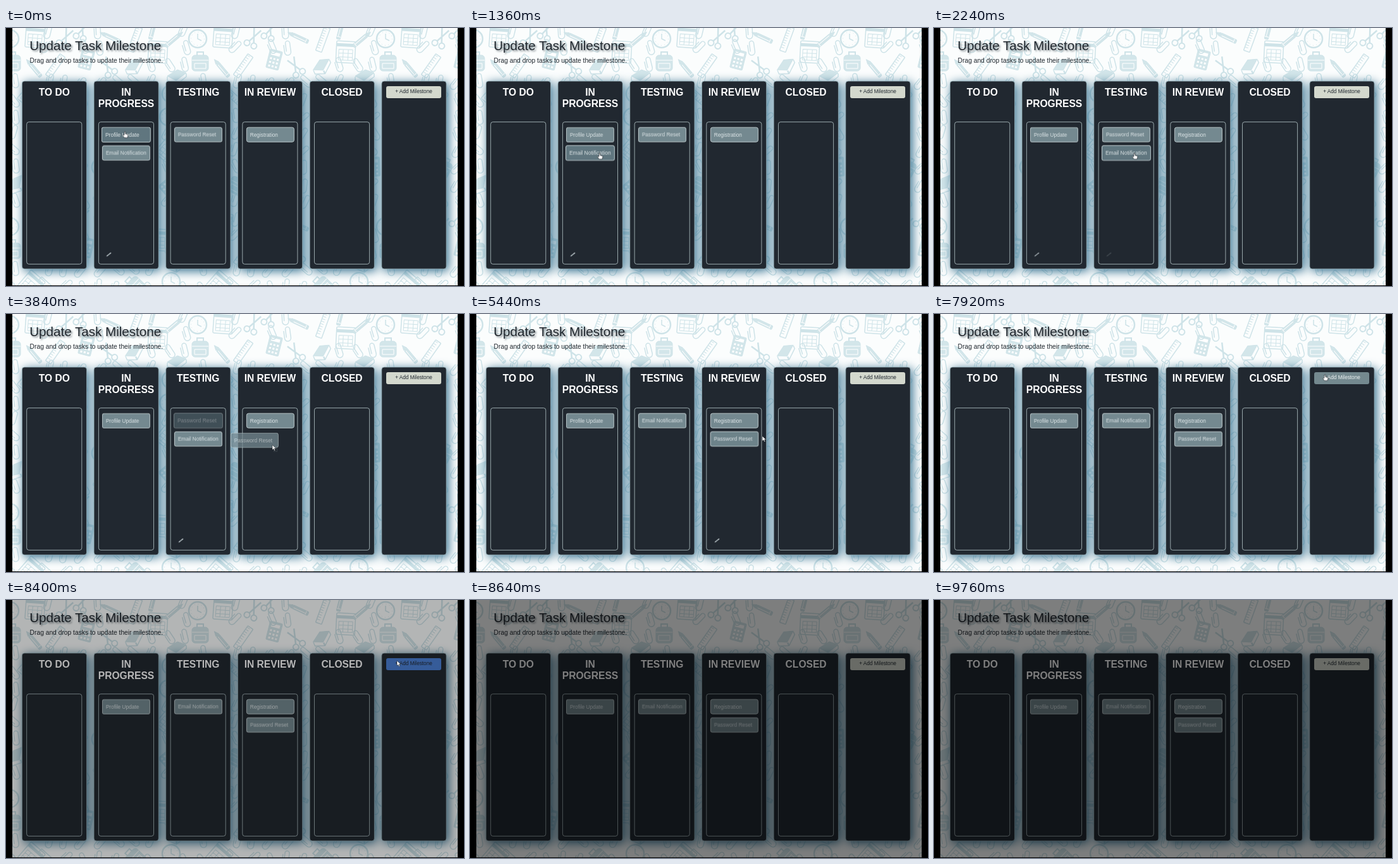
Animation of 724x408 px, one loop 9840 ms. Source, as an HTML page:

```html
<!DOCTYPE html>
<html lang="en">
<head>
<meta charset="utf-8">
<title>Update Task Milestone</title>
<style>
  html, body { margin: 0; width: 100%; height: 100%; overflow: hidden; background: #000; }
  #stage { position: relative; width: 724px; height: 408px; overflow: hidden; font-family: Arial, "Liberation Sans", sans-serif; }
  #stage * { box-sizing: border-box; }
  #stage > * { position: absolute; }
  #page { left: 10px; top: 0; width: 704px; height: 407px; background: #fbfdfd; }
  .title { font-size: 20.6px; fill: #20272e; text-shadow: 2px 2px 3px #7d868b; }
  .hint { font-size: 10.27px; fill: #20272e; }
  .col { fill: #212830; stroke: #a3bdc5; stroke-width: .8; filter: drop-shadow(3px 3px 8px #2f6c8c); }
  .list { fill: none; stroke: #b7c7ca; stroke-width: .8; }
  .name { font-size: 15.6px; font-weight: bold; text-anchor: middle; fill: #fff; }
  .card { left: 0; top: 0; width: 76px; height: 24px; }
  .card div { height: 100%; padding-left: 4.8px; border: 1px solid #b9c5c8; border-radius: 3.5px; background: #748990; color: #dbe3e5; font-size: 8.3px; line-height: 22px; white-space: nowrap; }
  #add { left: 601px; top: 92px; width: 87px; height: 18.5px; border-radius: 3px; background: #d3d8cd; color: #212830; font-size: 8.2px; line-height: 18px; text-align: center; }
  #dim { left: 10px; top: 0; width: 704px; height: 408px; background: #000; opacity: 0; }
  svg { left: 0; top: 0; overflow: visible; }
</style>
</head>
<body>
<div id="stage">
  <div id="page"></div>
  <svg id="paper" width="724" height="408">
    <defs>
      <clipPath id="pageClip"><rect x="10" width="704" height="407"/></clipPath>
      <g id="clock"><circle r="14" fill="none" stroke-width="2.5"/><circle r="10.5" fill="none" stroke-dasharray="1 4.5"/><path d="M0-8V0L6 3" fill="none" stroke-width="1.5"/></g>
      <g id="sheet"><rect x="-15" y="-17" width="30" height="34" rx="2" fill="none" stroke-width="1.5"/><path d="M-15-11H15" stroke-width="5"/><path d="M-11-4H11M-11 2H11M-11 8H11M-11 13H11M-11-4V13M-4-4V13M4-4V13M11-4V13" fill="none"/></g>
      <g id="scissors" fill="none"><circle cx="-6" cy="11" r="4.5" stroke-width="2"/><circle cx="6" cy="11" r="4.5" stroke-width="2"/><path d="M-4 7L6-16M4 7L-6-16" stroke-width="2.5"/></g>
      <g id="pencil"><rect x="-3" y="-13" width="6" height="27" rx="1.5"/><path d="M-3-14L0-21L3-14Z"/><path d="M-1-11V9M-3 10H3" stroke="#fff"/></g>
      <g id="bag"><path d="M-5-11V-16H5V-11" fill="none" stroke-width="2"/><rect x="-13" y="-11" width="26" height="25" rx="5"/><path d="M-9 2H9V10H-9ZM-13-3H13" fill="none" stroke="#fff"/></g>
      <g id="calc"><rect x="-10" y="-15" width="20" height="30" rx="2"/><path d="M-7-9H7" stroke="#fff" stroke-width="5"/><path d="M-7-1H7M-7 5H7M-7 11H7" stroke="#fff" stroke-width="3" stroke-dasharray="3 2.5"/></g>
      <g id="cube"><path d="M-15 2L1-8L15-3L-1 9Z"/><path d="M-15 3V9L-1 15V10M0 10V15L15 3V-2" fill="none" stroke-width="1.5"/></g>
      <g id="ruler"><rect x="-5" y="-20" width="10" height="40" rx="1" fill="none" stroke-width="1.5"/><path d="M-2-18V18" stroke-width="5" stroke-dasharray="1 3"/></g>
      <g id="clip" fill="none"><path d="M-3 7V-6A3 3 0 0 1 4-6V8A5 5 0 0 1-6 8V-4" stroke-width="1.5"/></g>
      <g id="tile" fill="#d3e6ea" stroke="#cee3e8"></g>
    </defs>
    <g id="tiles" clip-path="url(#pageClip)"></g>
    <text class="title" x="37.2" y="35.2">Update Task Milestone</text>
    <text class="hint" x="37.6" y="55.4">Drag and drop tasks to update their milestone.</text>
    <g id="board"></g>
  </svg>
  <div id="add">+ Add Milestone</div>
  <svg id="icons" width="724" height="408"></svg>
  <div id="dim"></div>
  <svg id="cursor" width="1" height="1">
    <g id="hand"><path transform="scale(.85)" d="M-1 0Q0-1 1 0V4L5 5Q6 5.5 5.5 8L4.5 11H-1L-4 7Q-4 5-1.5 6.5Z" fill="#fff" stroke="#1b2025" stroke-width=".8"/></g>
    <g id="arrow"><path d="M0 0V8L2 6.3L3.4 9.2L4.7 8.6L3.4 5.8H6Z" fill="#fff" stroke="#15191d" stroke-width=".5"/></g>
    <rect id="drop" x="2.5" y="5.5" width="5" height="5" fill="none" stroke="#66727a" stroke-width=".6" stroke-dasharray="1 1"/>
  </svg>
</div>
<script>
const LOOP = 9840;
const $ = id => document.getElementById(id);
const stage = $('stage'), add = $('add'), dim = $('dim');

// stops: [ms, value, ...]; the last value holds until the loop restarts
function play(el, prop, stops, easing = 'linear') {
  const keys = [];
  for (let i = 0; i < stops.length; i += 2)
    keys.push({ offset: stops[i] / LOOP, [prop]: stops[i + 1], easing });
  keys.push({ offset: 1, [prop]: stops[stops.length - 1] });
  el.animate(keys, { duration: LOOP, iterations: Infinity });
}
const HOLD = 'steps(1, end)', GLIDE = 'ease-in-out';
const at = (x, y) => `translate(${x}px, ${y}px)`;
const slot = (col, row) => [151.9 + 114 * (col - 1), 156.7 + 29 * row];

// Backdrop of school things, repeated as a square tile
const SIZE = 297;
const things = [
  ['clock', 50, 17], ['bag', 54, 54], ['sheet', 90, 14, 4], ['scissors', 138, 16, 25],
  ['pencil', 10, 20, 50], ['cube', 17, 74], ['calc', 171, 50, 14], ['ruler', 122, 60, 35],
  ['pencil', 90, 66, -40], ['scissors', 205, 62, -30], ['pencil', 212, 16, -65],
  ['sheet', 284, 38, 3], ['ruler', 248, 18, 20], ['clock', 8, 104]
];
let seed = 7;
const rand = () => (seed = seed * 16807 % 2147483647) / 2147483647;
const kinds = ['pencil', 'bag', 'scissors', 'calc', 'pencil', 'clock', 'ruler', 'cube', 'clip', 'sheet'];
const placed = things.slice();
// fill the gaps: a jittered grid that keeps clear of the things already placed
for (let n = 0; n < 121; n++) {
  const x = n % 11 * 27 + rand() * 6, y = (n / 11 | 0) * 27 + rand() * 6;
  const near = Math.min(...placed.map(p => Math.hypot(p[1] - x, p[2] - y)));
  const small = near < 28;
  if (near > 19) placed.push([small ? 'clip' : kinds[n * 7 % 10], x, y, rand() * 100 - 50]);
}
$('tile').innerHTML = placed.map(([kind, x, y, turn = 0]) =>
  `<use href="#${kind}" transform="translate(${x} ${y}) rotate(${turn})"/>`).join('');
for (const y of [0, SIZE])
  for (const x of [-44, 253, 550]) $('tiles').innerHTML += `<use href="#tile" x="${x}" y="${y}"/>`;

// Columns
$('board').innerHTML = ['TO DO', 'IN PROGRESS', 'TESTING', 'IN REVIEW', 'CLOSED', ''].map((name, i) => {
  const lines = name === 'IN PROGRESS' ? name.split(' ') : [name];
  const heading = lines.map((line, n) => `<text class="name" x="51" y="${22.6 + 18.6 * n}">${line}</text>`).join('');
  const list = name && '<rect class="list" x="7.4" y="64.6" width="87.1" height="224.8" rx="3.5"/>';
  return `<g transform="translate(${25.3 + 113.7 * i} 84)">
    <rect class="col" width="102.3" height="297" rx="4"/>${heading}${list}</g>`;
}).join('');

// Edit icons of the column under the pointer
[[0, 1, 2180, 1, 2480, 0], [0, 0, 2180, 0, 2480, 1, 4440, 1, 4740, 0], [0, 0, 4440, 0, 4740, 1, 5500, 1, 5800, 0]]
  .forEach((fade, i) => {
    const icon = document.createElementNS('http://www.w3.org/2000/svg', 'g');
    icon.innerHTML = `<g transform="translate(${162.3 + 114 * i} 358.4) rotate(-38)">
      <path d="M-4.8 0L-2.5-.9H4.5V.9H-2.5Z" fill="#b4bdc1"/><path d="M-2 0H2.5" stroke="#4a545b" stroke-width=".7"/></g>`;
    $('icons').append(icon);
    play(icon, 'opacity', fade);
  });

// Cards
function card(text, x, y) {
  const el = document.createElement('div');
  el.className = 'card';
  el.innerHTML = `<div>${text}</div>`;
  el.style.transform = at(x, y);
  stage.insertBefore(el, $('icons'));
  return el;
}
function hover(el, from, to) {
  const face = el.firstChild;
  const run = (prop, off, on) => play(face, prop, from
    ? [0, off, from, off, from + 150, on, to, on, to + 150, off]
    : [0, on, to, on, to + 150, off]);
  run('transform', 'scale(1)', 'scale(1.025)');
  run('backgroundColor', '#748990', '#60767f');
}
function drag(el, start, end, x, y, path) {
  play(el, 'opacity', [0, 1, start, .5, end, 1], HOLD);
  const ghost = card(el.textContent, x, y);
  play(ghost, 'opacity', [0, 0, start, .75, end, 0], HOLD);
  const [, x0, y0] = path[0];
  play(ghost, 'transform', [0, at(x, y), ...path.flatMap(([t, px, py]) => [t, at(x + px - x0, y + py - y0)])], GLIDE);
}
const profile = card('Profile Update', ...slot(1, 0));
card('Registration', ...slot(3, 0));
const email = card('Email Notification', ...slot(1, 1));
const reset = card('Password Reset', ...slot(2, 0));

const carryEmail = [[1600, 205, 198], [2120, 317, 198]];
const carryReset = [[3600, 332, 176], [3840, 421, 207], [4400, 432, 204]];
play(email, 'transform', [0, at(...slot(1, 1)), 2120, at(...slot(2, 1)), 4400, at(...slot(2, 0))], HOLD);
play(reset, 'transform', [0, at(...slot(2, 0)), 4400, at(...slot(3, 1))], HOLD);
hover(profile, 0, 620);
hover(email, 700, 2760);
hover(reset, 2900, 5340);
drag(email, 1600, 2120, ...slot(1, 1), carryEmail);
drag(reset, 3600, 4400, ...slot(2, 0), carryReset);

// Pointer
const route = [
  [0, 188, 164], [400, 188, 164], [1100, 205, 198], ...carryEmail,
  [2560, 317, 198], [3200, 332, 176], ...carryReset,
  [5120, 432, 200], [5440, 462, 193], [5680, 468, 190], [6400, 618, 96]
];
play($('cursor'), 'transform', route.flatMap(([t, x, y]) => [t, at(x, y)]), GLIDE);
play($('cursor'), 'opacity', [0, 1, 8640, 0], HOLD);
const hand = [0, 1, 1600, 0, 2120, 1, 3600, 0, 4400, 1, 5360, 0, 6320, 1, 8320, 0];
play($('hand'), 'opacity', hand, HOLD);
play($('arrow'), 'opacity', hand.map((v, i) => i % 2 ? 1 - v : v), HOLD);
play($('drop'), 'opacity', [0, 0, 1600, 1, 2120, 0, 3600, 1, 4400, 0], HOLD);

// Button and dimmed page
const cream = '#d3d8cd', slate = '#74898f', blue = '#4c80d6';
play(add, 'backgroundColor', [0, cream, 6320, cream, 6470, slate, 8300, slate, 8390, blue, 8480, blue, 8630, cream]);
play(add, 'color', [0, '#212830', 6320, '#212830', 6470, '#eef3f3', 8300, '#eef3f3', 8390, '#212830']);
play(dim, 'opacity', [0, 0, 8315, 0, 8465, .5]);
</script>
</body>
</html>
```
